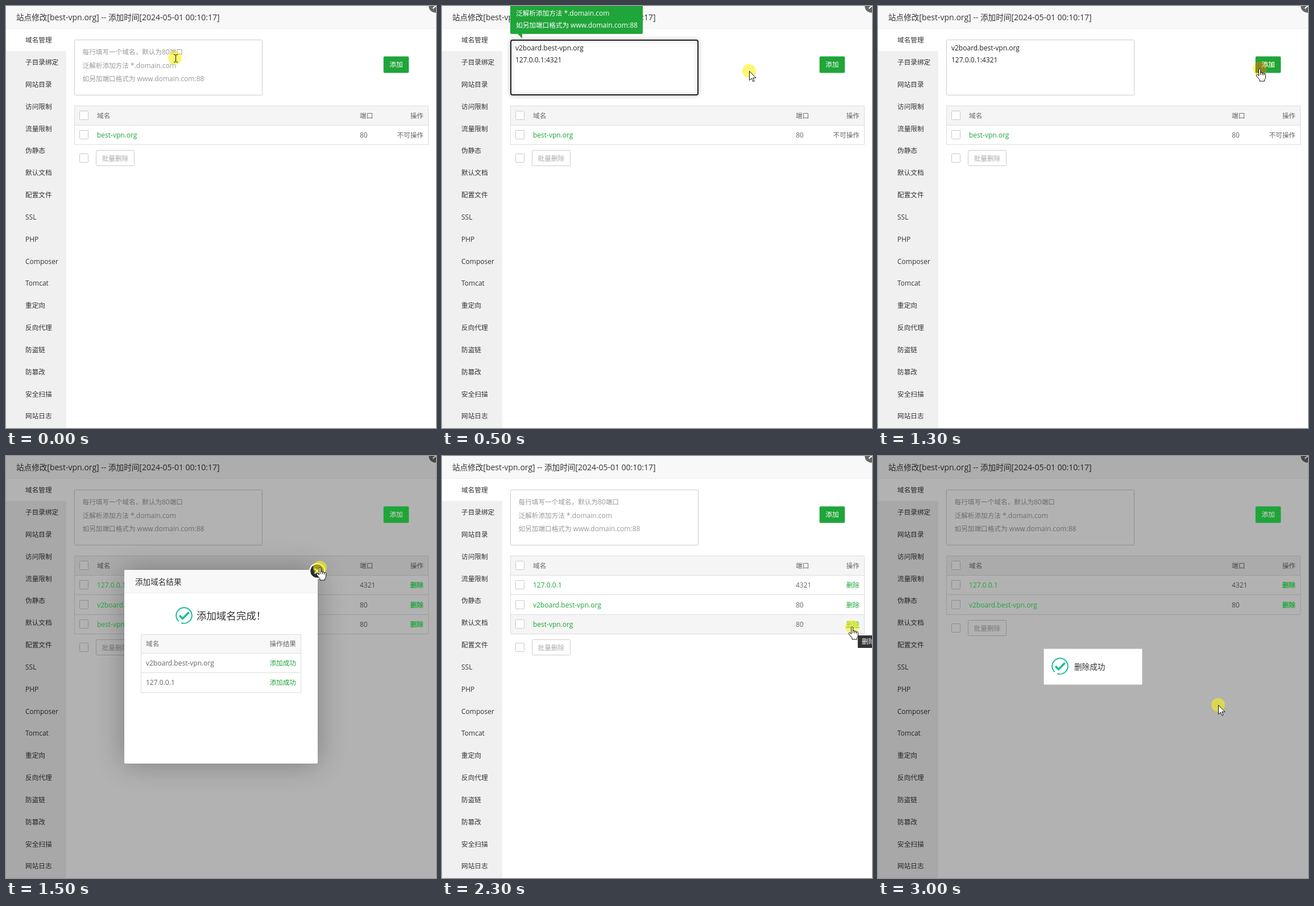
Write an HTML page with a canvas that moves like this. It is 756 px wide and 741 px high and loops after 3500 ms.

```html
<!DOCTYPE html>
<html lang="zh-CN">
<head>
<meta charset="utf-8">
<title>域名管理</title>
<style>
html, body { margin: 0; width: 100%; height: 100%; overflow: hidden; background: #fff; }
canvas { display: block; }
</style>
</head>
<body>
<canvas id="stage" width="756" height="741"></canvas>
<script>
const ctx = document.getElementById('stage').getContext('2d');
const W = 756, H = 741, STEP = 500;
const GREEN = '#20a53a', TEAL = '#1abc9c', LINE = '#ddd';
const FONT = '"Open Sans", "Noto Sans CJK SC", "Noto Sans CJK", sans-serif';
const HAN_SCALE = 0.97;
const RUNS = /[\u2e80-\uffef]+|[^\u2e80-\uffef]+/g;
const SITE = 'best-vpn.org', SUB = 'v2board.best-vpn.org', IP = '127.0.0.1';
const MENU = ['域名管理', '子目录绑定', '网站目录', '访问限制', '流量限制', '伪静态', '默认文档', '配置文件', 'SSL',
  'PHP', 'Composer', 'Tomcat', '重定向', '反向代理', '防盗链', '防篡改', '安全扫描', '网站日志'];
const ROWS = [[IP, '4321'], [SUB, '80'], [SITE, '80']];
const ADD_BUTTON = [663.7, 88.4, 44.6, 29.1], OK_BUTTON = [489, 418.5, 46.6, 29.1];

const SCENES = [
  { rows: ROWS.slice(2), spot: [297, 91], cursor: 'beam' },
  { rows: ROWS.slice(2), typed: true, focus: true, spot: [540, 114], cursor: 'arrow' },
  { rows: ROWS.slice(2), typed: true, spot: [671, 110], cursor: 'hand', over: [...ADD_BUTTON, '添加'] },
  { rows: ROWS, popup: resultDialog, spot: [552, 196], cursor: 'hand' },
  { rows: ROWS, hover: 2, spot: [721, 300], cursor: 'hand' },
  { rows: ROWS, popup: confirmDialog, pressed: 2, spot: [519, 438], cursor: 'hand', over: [...OK_BUTTON, '确定'] },
  { rows: ROWS.slice(0, 2), popup: toast, spot: [598, 437], cursor: 'arrow' }
];

const HAND = new Path2D('M-1.5 1.5a1.5 1.5 0 0 1 3 0V8a1.5 1.5 0 0 1 3 0V9a1.5 1.5 0 0 1 3 .3V10' +
  'a1.5 1.5 0 0 1 3 .5V15q0 3-2 4.5V22H0v-2.5L-5.5 13a1.6 1.6 0 0 1 2.5-2.2L-1.5 12.5Z');
const KNUCKLES = new Path2D('M1.5 8v3M4.5 8.5v3M7.5 9.5v2.5');
const ARROW = new Path2D('M.5 .5V16.5L4.2 13 6.8 18.7 9.2 17.6 6.6 12.2H12Z');
const BEAM = new Path2D('M-3 -6.5H-1L.5 -5.5 2 -6.5H4M.5 -5.5V5.5M-3 6.5H-1L.5 5.5 2 6.5H4');

// y is the middle of the glyphs; Han runs are set slightly smaller than Latin ones
function text(str, x, y, color = '#333', size = 12, align = 'left', weight = 400) {
  const setFont = run => {
    const scale = run.charCodeAt(0) >= 0x2e80 ? HAN_SCALE : 1;
    ctx.font = `${weight} ${size * scale}px ${FONT}`;
  };
  const runs = str.match(RUNS).map(run => {
    setFont(run);
    return { run, width: ctx.measureText(run).width };
  });
  const total = runs.reduce((sum, { width }) => sum + width, 0);
  if (align === 'right') x -= total;
  if (align === 'center') x -= total / 2;
  ctx.fillStyle = color;
  for (const { run, width } of runs) {
    setFont(run);
    ctx.fillText(run, x, Math.round(y + size * 0.36));
    x += width;
  }
}

function rect(x, y, w, h, color) {
  ctx.fillStyle = color;
  ctx.fillRect(x, y, w, h);
}

function box(x, y, w, h, fill, stroke, radius = 0, width = 1) {
  const half = stroke ? width / 2 : 0;
  ctx.beginPath();
  ctx.roundRect(x + half, y + half, w - 2 * half, h - 2 * half, radius);
  if (fill) { ctx.fillStyle = fill; ctx.fill(); }
  if (stroke) { ctx.strokeStyle = stroke; ctx.lineWidth = width; ctx.stroke(); }
}

function disc(x, y, r, color) {
  ctx.beginPath();
  ctx.arc(x, y, r, 0, 2 * Math.PI);
  ctx.fillStyle = color;
  ctx.fill();
}

function lines(points, color, width) {
  ctx.beginPath();
  points.forEach(([x, y]) => ctx.lineTo(x, y));
  ctx.strokeStyle = color;
  ctx.lineWidth = width;
  ctx.stroke();
}

function shadowed(color, blur, paint) {
  ctx.save();
  ctx.shadowColor = color;
  ctx.shadowBlur = blur;
  paint();
  ctx.restore();
}

function button(x, y, w, h, label, fill = GREEN, color = '#fff', weight = 400) {
  box(x, y, w, h, fill, null, 2);
  text(label, x + w / 2, y + h / 2, color, 12, 'center', weight);
}

const checkbox = y => box(129, y - 8, 16, 16, '#fff', '#c8c8c8', 1);

function closeButton(x, y, fill) {
  disc(x, y, 14, '#fff');
  disc(x, y, 11.8, fill);
  lines([[x - 4.5, y - 4.5], [x + 4.5, y + 4.5]], '#fff', 2);
  lines([[x + 4.5, y - 4.5], [x - 4.5, y + 4.5]], '#fff', 2);
}

function ring(x, y, color) {
  ctx.beginPath();
  ctx.arc(x, y, 13.8, 2.3, 2.3 + 5.9);
  ctx.strokeStyle = color;
  ctx.lineWidth = 2;
  ctx.stroke();
}

function checkIcon(x, y) {
  ring(x, y, TEAL);
  lines([[x - 8, y], [x - 2.5, y + 5.5], [x + 8.5, y - 5.5]], TEAL, 3.6);
}

function frame() {
  rect(0, 0, W, H, '#fff');
  rect(0, 0, W, 39, '#f8f8f8');
  rect(0, 39, W, 1, '#eee');
  text(`站点修改[${SITE}] -- 添加时间[2024-05-01 00:10:17]`, 18, 19.5, '#333', 14);
  closeButton(755, 0, '#666');
  rect(0, 40, 106, H - 40, '#f0f0f0');
  rect(0, 40, 106, 39, '#fff');
  MENU.forEach((item, i) => text(item, 34, 60 + i * 38.83));
}

function domainInput({ typed, focus }) {
  if (focus) {
    shadowed('rgba(0,0,0,.25)', 7, () => box(120, 59, 331, 98, '#fff', '#222', 3, 2));
  } else {
    box(120, 59, 331, 98, '#fff', '#ccc', 2);
  }
  if (typed) {
    text(SUB, 129, 74, '#222');
    text(IP + ':4321', 129, 95, '#222');
  } else {
    text('每行填写一个域名，默认为80端口', 134.5, 81, '#999');
    text('泛解析添加方法 *.domain.com', 134.5, 105, '#999');
    text('如另加端口格式为 www.domain.com:88', 134.5, 128, '#999');
  }
  if (focus) hintBubble();
}

function hintBubble() {
  box(120, -4, 233, 53, GREEN, null, 2);
  ctx.beginPath();
  ctx.moveTo(133, 49);
  ctx.lineTo(141, 49);
  ctx.lineTo(141, 57);
  ctx.fill();
  text('泛解析添加方法 *.domain.com', 130, 13, '#fff');
  text('如另加端口格式为 www.domain.com:88', 130, 34, '#fff');
}

const rowY = i => Math.round(227 + 34.5 * i);

function domainTable({ rows, hover }) {
  const bottom = Math.round(209 + 34.4 * rows.length);
  rect(121, 176, 621, 33, '#f5f5f5');
  if (hover !== undefined) rect(121, rowY(hover) - 17, 621, 34, '#f5f5f5');
  box(120, 175, 623, bottom - 174, null, LINE);
  checkbox(192);
  text('域名', 160, 193, '#666');
  text('端口', 622, 193, '#666');
  text('操作', 734, 193, '#666', 12, 'right');
  rows.forEach(([, port], i) => {
    rect(121, Math.round(209 + 34.4 * i), 621, 1, LINE);
    checkbox(rowY(i) - 1);
    text(port, 622, rowY(i), '#666');
  });
  checkbox(bottom + 24);
  box(158, bottom + 10, 68, 28, '#fff', '#ccc', 2);
  text('批量删除', 168.5, bottom + 24.5, '#aaa');
}

// Green controls keep their strength above the shade
function greenParts({ rows, popup, hover, pressed }) {
  button(...ADD_BUTTON, '添加', GREEN, popup ? '#e6d3da' : '#fff');
  rows.forEach(([name], i) => {
    const y = rowY(i), active = i === pressed;
    text(name, 160, y, GREEN);
    if (rows.length === 1) return text('不可操作', 734, y, '#666', 12, 'right');
    const color = active ? '#444' : GREEN;
    text('删除', 734, y, color, 12, 'right', popup && !active ? 700 : 400);
    if (active || i === hover) rect(710, y + 5, 24, 1, color);
  });
  if (hover !== undefined) {
    rect(731, 315, 25, 22, '#333');
    text('删除', 738, 326, '#fff');
  }
}

function panel(x, y, w, h, title, titleX) {
  shadowed('rgba(0,0,0,.3)', 50, () => box(x, y, w, h, '#fff', null, 2));
  box(x, y, w, 40, '#f8f8f8', null, [2, 2, 0, 0]);
  rect(x, Math.floor(y + 40), w, 1, '#eee');
  text(title, titleX, y + 20.5, '#333', 14);
}

function resultDialog() {
  panel(208, 200, 340, 340, '添加域名结果', 227);
  checkIcon(313, 280);
  text('添加域名完成！', 335, 280.5, '#333', 18);
  rect(238, 314, 280, 32, '#f8f8f8');
  box(237, 313, 282, 103, null, LINE);
  text('域名', 246, 330, '#666');
  text('操作结果', 510, 330, '#666', 12, 'right');
  [SUB, IP].forEach((name, i) => {
    const y = 364 + 34 * i;
    rect(238, y - 18, 280, 1, LINE);
    text(name, 246, y, '#666');
    text('添加成功', 510, y, GREEN, 12, 'right');
  });
  closeButton(547, 202, '#2d2d2d');
}

function confirmDialog() {
  panel(203, 282.5, 350, 175, `删除域名【${SITE}】`, 222);
  ring(232, 354, '#d6d62c');
  text('?', 232, 354, '#d6d62c', 20, 'center', 700);
  text('删除选中的域名后，将无法使用该域名访问网', 256.5, 355, '#333', 14);
  text('站，是否继续操作？', 256.5, 378, '#333', 14);
  rect(203, 409, 350, 48.5, '#f8f8f8');
  rect(203, 409, 350, 1, '#eee');
  button(434, 418.5, 46.6, 29.1, '取消', '#c8c8c8', '#fff', 700);
  button(...OK_BUTTON, '确定', GREEN, '#fff', 700);
  closeButton(551, 285, '#5e5e5e');
}

function toast() {
  box(291, 338, 174, 64, '#fff', '#d0d0d0', 1);
  checkIcon(320, 369);
  text('删除成功', 345, 370, '#333', 14);
}

function pointer({ spot: [x, y], cursor, over, popup }) {
  disc(x, y, 12, 'rgba(250,243,10,.57)');
  if (over) {
    const [bx, by, w, h, label] = over;
    ctx.save();
    ctx.beginPath();
    ctx.rect(bx, by, w, h);
    ctx.clip();
    disc(x, y, 12, '#8a8a1e');
    text(label, bx + w / 2, by + h / 2, '#fff8b0', 12, 'center', popup ? 700 : 400);
    ctx.restore();
  }
  ctx.save();
  ctx.translate(x, y);
  ctx.lineWidth = 1;
  ctx.strokeStyle = '#111';
  ctx.fillStyle = '#fff';
  if (cursor === 'beam') {
    ctx.translate(1, 1);
    ctx.stroke(BEAM);
  } else if (cursor === 'arrow') {
    ctx.fill(ARROW);
    ctx.stroke(ARROW);
  } else {
    ctx.fill(HAND);
    ctx.stroke(HAND);
    ctx.stroke(KNUCKLES);
  }
  ctx.restore();
}

function draw(scene) {
  frame();
  domainInput(scene);
  domainTable(scene);
  if (scene.popup) rect(0, 0, W, H, 'rgba(0,0,0,.3)');
  greenParts(scene);
  if (scene.popup) scene.popup();
  pointer(scene);
}

const start = performance.now();
function tick() {
  const elapsed = performance.now() - start;
  draw(SCENES[Math.floor(elapsed / STEP) % SCENES.length]);
  requestAnimationFrame(tick);
}
tick();
</script>
</body>
</html>
```
